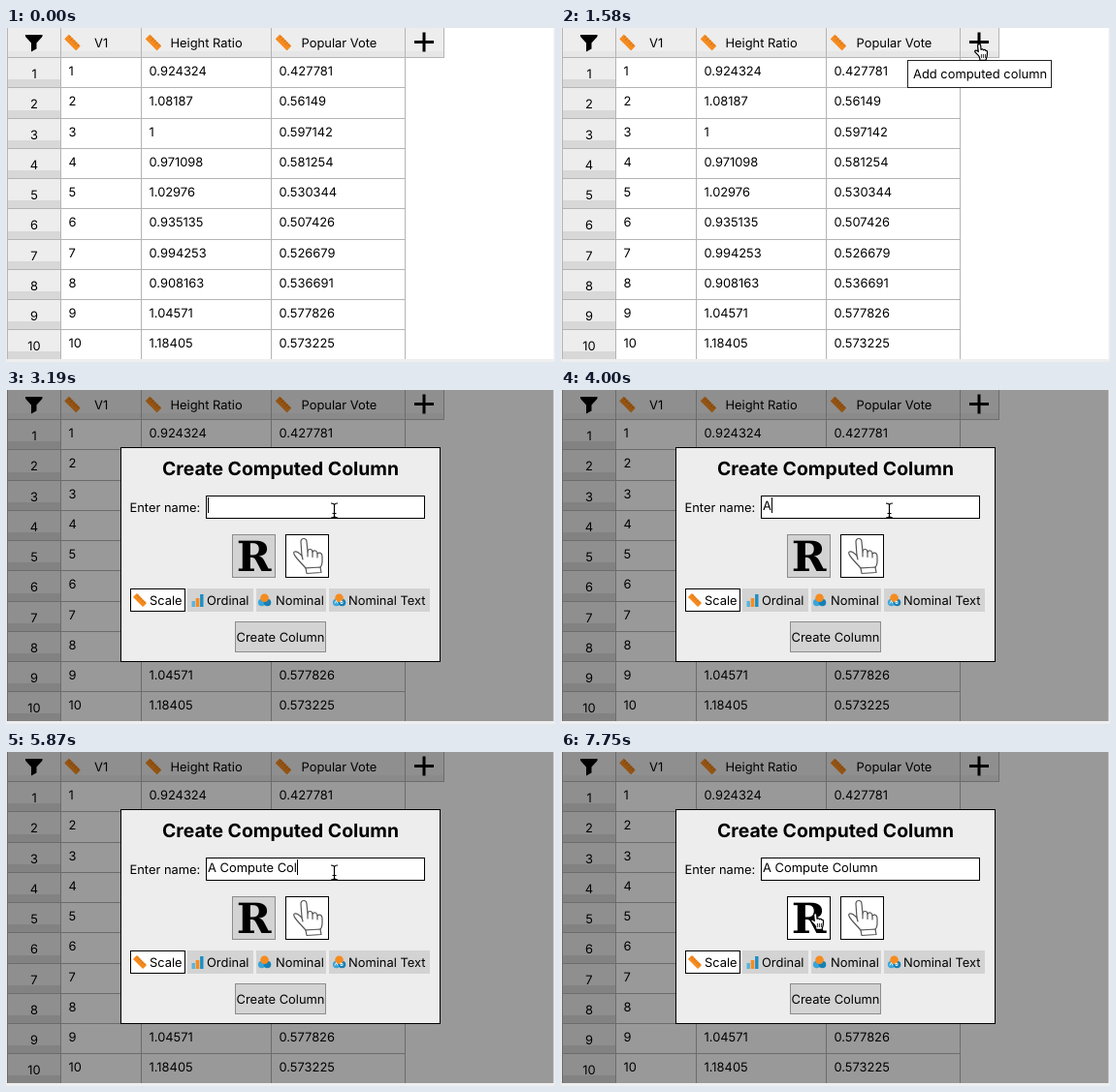
Animation, 566 px wide and 345 px high, one loop 8 s. Source, as an HTML page:

```html
<!DOCTYPE html>
<html lang="en">
<head>
<meta charset="utf-8">
<title>Create a computed column</title>
<style>
  html, body { margin: 0; width: 100%; height: 100%; overflow: hidden; background: #eee; }
  svg { display: block; width: 100vw; height: 100vh; font: 12.9px Inter, sans-serif; text-rendering: geometricPrecision; }
  .line { fill: none; stroke: #b4b4b4; }
  .head { fill: #ededed; }
  .mid { text-anchor: middle; }
  .boxed { fill: #fff; stroke: #000; }
  .button { fill: #d3d3d3; stroke: #8c8c8c; }
  .tab { fill: #d3d3d3; }
  .title { font-size: 19.35px; font-weight: 700; }
  .letter { font: 700 43px "DejaVu Serif", serif; }
  .sketch { fill: #fff; stroke: #555; stroke-width: 1.2; stroke-linejoin: round; stroke-linecap: round; }
  #typed { white-space: pre; }
</style>
</head>
<body>
<svg viewBox="0 0 566 345">
  <defs>
    <g id="ruler" transform="rotate(45)">
      <rect x="-8.5" y="-3.3" width="17" height="6.6" rx=".6" fill="#f68b1f"/>
      <path d="M-6 -3.3v2.6M-3 -3.3v3.4M0 -3.3v2.6M3 -3.3v3.4M6 -3.3v2.6" stroke="#b5651d" stroke-width=".8"/>
    </g>
    <g id="bars">
      <path d="M-6 6.5v-6h3.4v6z" fill="#56b4e0"/>
      <path d="M-1.8 6.5v-9h3.6v9z" fill="#f68b1f"/>
      <path d="M2.6 6.5v-13h3.4v13z" fill="#1c8fc4"/>
    </g>
    <g id="groups">
      <circle cx="-2.8" cy="2.5" r="3.8" fill="#3aa5d8"/>
      <circle cx="3" cy="2.5" r="3.8" fill="#1780b5"/>
      <circle cy="-2.2" r="4.3" fill="#f68b1f"/>
    </g>
    <g id="arrow">
      <path d="M.5.5V15L4 11.8 6.4 17.3 9 16.2 6.6 11h4.9z" stroke="#fff"/>
    </g>
    <g id="hand">
      <path d="M4.4 12.4 1 9Q0 7.5 1.6 7.1 3 7 4.3 8.6L3.6 2.2Q3.6.6 5.1.6 6.6.6 6.7 2.2L7 6.3Q8.9 5.1 9.4 6.8 11.3 5.8 11.8 7.4 13.4 6.9 13.5 9 13.7 13 12 17.3H6Q6 14.2 4.4 12.4z" fill="#fff" stroke="#000" stroke-width="1.2" stroke-linejoin="round"/>
      <path d="M7.4 11v4M9.4 11v4M11.4 11v4" stroke="#000" stroke-width=".8"/>
    </g>
    <g id="beam">
      <path d="M-3.5 -7.5Q0 -7.5 0 -5.5 0 -7.5 3.5 -7.5M0 -6V6M-3.5 7.5Q0 7.5 0 5.5 0 7.5 3.5 7.5M-2 3H2" fill="none" stroke="#000" stroke-width="1.2"/>
    </g>
  </defs>

  <rect x="1" width="563.5" height="342" fill="#fff"/>
  <g id="sheet"></g>
  <path d="M20 7H37.5Q38 9 36.5 10L31.5 15.5V21.5L26 24.5V15.5L21 10Q19.5 9 20 7z"/>
  <path d="M421 14.5h20M431 4.5v20" stroke="#000" stroke-width="3"/>

  <g id="tooltip">
    <rect class="boxed" x="357.5" y="33.5" width="148" height="28" style="stroke:#222"/>
    <text x="363" y="52">Add computed column</text>
  </g>

  <g id="dialog">
    <rect x="1" width="563.5" height="342" opacity=".4"/>
    <rect x="118.5" y="59.5" width="329" height="221" fill="#ededed" stroke="#000"/>
    <text class="title mid" x="283" y="88">Create Computed Column</text>
    <text x="127.5" y="125.5">Enter name:</text>
    <rect class="boxed" x="206.5" y="109.5" width="225" height="23"/>
    <text id="typed" x="208" y="123.5" xml:space="preserve"></text>
    <rect id="caret" y="111" width="1" height="16"/>

    <rect id="codeButton" x="233.5" y="149.5" width="44" height="44"/>
    <text class="letter mid" x="255.5" y="187">R</text>
    <rect class="boxed" x="288.5" y="149.5" width="44" height="44"/>
    <g class="sketch">
      <path d="M309 184 300 174Q295 168 297.5 167 300 166 305 171L304 157Q304 153.5 307 153.5 310 153.5 310 157L311 167Q311 164.5 313.5 164.5 316 164.5 316 167.5 317 165.5 319 166 321 166.5 321 169 323 167.5 324.5 168.5 326 169.5 326 172V178Q326 181 323.5 184z"/>
      <path d="M309 184l1 5.5 15 -1 -1 -5.5zM305 171l1 4M311 167v5M316 167.5v5M321 169v4"/>
    </g>

    <rect class="boxed" x="128.5" y="205.5" width="56" height="23"/>
    <rect class="tab" x="187" y="205" width="68" height="24"/>
    <rect class="tab" x="258" y="205" width="72" height="24"/>
    <rect class="tab" x="333" y="205" width="104" height="24"/>
    <use href="#ruler" transform="translate(138 217) scale(.84)"/>
    <use href="#bars" x="197.5" y="217.5"/>
    <use href="#groups" x="266.5" y="217"/>
    <use href="#groups" x="343.5" y="217"/>
    <path d="M339 220.5l1.5 -3 1.5 3M345 217.5v3h2v-2h-2" fill="none" stroke="#fff" stroke-width=".8"/>
    <text x="148" y="221.5">Scale</text>
    <text x="207" y="221.5">Ordinal</text>
    <text x="278" y="221.5">Nominal</text>
    <text x="353" y="221.5">Nominal Text</text>
    <rect class="button" x="236.5" y="239.5" width="93" height="31"/>
    <text class="mid" x="283" y="259.5">Create Column</text>
  </g>
  <use id="cursor"/>
</svg>

<script>
const LOOP = 8000;
const ROWS = 10;
const ROW = 31.25;
const TOP = 30;
const $ = id => document.getElementById(id);

const columns = [
  { x: 56, icon: 68.5, label: 91, name: 'V1', values: '1 2 3 4 5 6 7 8 9 10' },
  { x: 139, icon: 152, label: 169.5, name: 'Height Ratio',
    values: '0.924324 1.08187 1 0.971098 1.02976 0.935135 0.994253 0.908163 1.04571 1.18405' },
  { x: 273, icon: 286, label: 304.5, name: 'Popular Vote',
    values: '0.427781 0.56149 0.597142 0.581254 0.530344 0.507426 0.526679 0.536691 0.577826 0.573225' }
];

function drawSheet() {
  const text = (x, y, s, cls = '') => `<text class="${cls}" x="${x}" y="${y}">${s}</text>`;
  const line = d => `<path class="line" d="${d}"/>`;
  let out = '<path class="head" d="M1 0H452V30H57V342H1z"/>';
  out += '<rect x="1" y="24" width="451" height="6" fill="#e6e6e6"/>';
  for (let i = 0; i < ROWS; i++) {
    const y = Math.round(TOP + i * ROW);
    const end = Math.min(342, Math.round(TOP + (i + 1) * ROW));
    out += `<rect x="1" y="${end - 8}" width="55" height="8" fill="#d8d8d8"/>`;
    if (i < ROWS - 1) out += line(`M1 ${end + .5}H411`);
    out += text(29, y + 21.5, i + 1, 'mid');
    for (const c of columns) out += text(c.x + 8.5, y + 19, c.values.split(' ')[i]);
  }
  out += line('M1.5 0V342M1 30.5H452M411.5 0V342M451.5 0V30');
  for (const c of columns) {
    out += line(`M${c.x + .5} 0V342`) + text(c.label, 20, c.name);
    out += `<use href="#ruler" x="${c.icon}" y="15"/>`;
  }
  $('sheet').innerHTML = out;
}

// [start, cursor, x, y]
const pointer = [
  [0, '', 0, 0],
  [500, 'arrow', 519, 48],
  [770, 'arrow', 476, 32],
  [1040, 'arrow', 441, 21],
  [1310, 'hand', 426, 16],
  [2380, 'arrow', 430, 15],
  [2650, 'arrow', 427, 23],
  [2920, 'arrow', 391, 96],
  [3190, 'beam', 338.5, 124.5],
  [7220, 'beam', 360, 124.5],
  [7480, 'arrow', 283, 132],
  [7750, 'hand', 257, 166]
];

// [start, letters typed]
const typing = [
  [0, 0], [4000, 1], [4270, 2], [4530, 3], [4800, 6], [5070, 9], [5340, 10],
  [5610, 11], [5870, 13], [6140, 14], [6410, 16]
];

// [start, caret visible]
const blinking = [
  [0, false], [2380, true], [2650, false], [3190, true], [3730, false],
  [4000, true], [6680, false], [6950, true], [7480, false]
];

const at = (steps, t) => steps.findLast(([start]) => start <= t);
const show = (id, on) => $(id).setAttribute('visibility', on ? 'visible' : 'hidden');

function render(t) {
  const [, shape, x, y] = at(pointer, t);
  const cursor = $('cursor');
  cursor.setAttribute('href', '#' + (shape || 'arrow'));
  cursor.setAttribute('x', x);
  cursor.setAttribute('y', y);
  show('cursor', shape);
  show('tooltip', t >= 1580 && t < 2380);
  $('dialog').style.display = t >= 2380 ? '' : 'none';

  const typed = $('typed');
  const value = 'A Compute Column'.slice(0, at(typing, t)[1]);
  if (typed.textContent !== value) typed.textContent = value;
  const width = value && t >= 2380 ? typed.getComputedTextLength() : 0;
  $('caret').setAttribute('x', Math.round(208 + width));
  show('caret', at(blinking, t)[1]);
  $('codeButton').setAttribute('class', t >= 7750 ? 'boxed' : 'button');
}

function tick() {
  render(performance.now() % LOOP);
  requestAnimationFrame(tick);
}

drawSheet();
tick();
</script>
</body>
</html>
```
